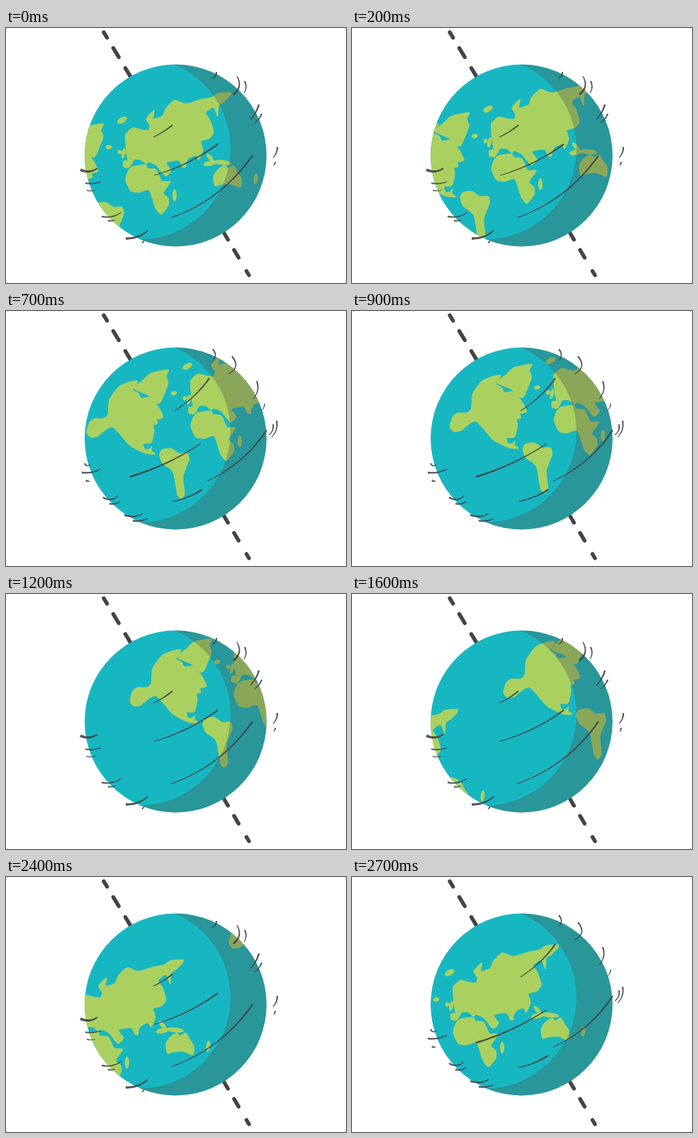
Write an HTML page with a canvas that moves like this. It is 480 px wide and 360 px high and loops after 2.8 s.

```html
<!DOCTYPE html>
<html lang="en">
<head>
<meta charset="utf-8">
<title>Spinning globe</title>
<style>
html, body { margin: 0; width: 480px; height: 360px; overflow: hidden; background: #fff; }
canvas { display: block; }
</style>
</head>
<body>
<canvas id="stage" width="480" height="360"></canvas>
<script>
const ctx = document.getElementById('stage').getContext('2d');
const LOOP = 2800, STEP = 100;
const OCEAN = '#17b7c2', LAND = '#aad15f', INK = '#444';
const GLOBE = { x: 239.4, y: 180, r: 128.4 };
const LIT = { x: 188.5, y: 170, r: 128.4 };

// A closed, lightly rounded curve through a few coast points.
function coast(outline) {
  const points = outline.trim().split(/\s+/).map(p => p.split(',').map(Number));
  const at = i => points[(i + points.length) % points.length];
  const path = new Path2D();
  path.moveTo(...at(0));
  points.forEach((p, i) => {
    const before = at(i - 1), q = at(i + 1), after = at(i + 2);
    const handle = (base, from, to) => base.map((v, k) => v + (to[k] - from[k]) / 9);
    path.bezierCurveTo(...handle(p, before, q), ...handle(q, after, p), ...q);
  });
  path.closePath();
  return path;
}

function island(x, y, rx, ry, angle = 0) {
  const path = new Path2D();
  path.ellipse(x, y, rx, ry, angle, 0, Math.PI * 2);
  return path;
}

const eurasia = coast(`169,163 169,150 179,141 193,144 201,144 203,137 198,128 209,116
  208,128 221,124 226,113 238,102 254,107 275,101 290,98 300,92 317,91 316,96 308,104
  300,110 299,125 293,112 282,120 288,130 293,147 287,156 275,160 278,172 272,186 268,180
  258,184 250,197 244,187 226,190 233,201 225,209 212,194 201,189 198,192 190,186 181,186
  174,197 166,196 166,188 172,187 170,176`);

const africa = coast(`178,196 197,193 200,198 212,200 220,216 232,217 222,233 229,240
  229,251 219,263 211,254 202,229 188,232 176,230 169,215 172,203`);

const australia = coast(`298,201 308,194 313,198 321,194 327,204 332,212 331,225 317,220
  303,221 295,223 293,210`);

const islands = [
  island(352.5, 213, 2.3, 7.5, .1),
  island(288, 183, 2.5, 7, -.7),
  island(288, 191, 9, 3.2, -.2),
  island(306, 190, 12, 3, .1),
  island(238, 236, 2.5, 8),
  island(252.5, 194.5, 1.5, 2.5),
  island(164, 130, 7, 3.6, -.5),
  island(145, 168, 4, 2.5, -.2),
  island(160.5, 175, 2.5, 2.8),
  island(166, 177, 2.2, 7, .2)
];

const northAmerica = coast(`175,151 179,137 186,132 198,132 205,126 207,105 220,87 236,80
  247,79 240,91 248,96 252,103 264,102 276,115 283,130 274,133 275,139 269,141 270,150
  266,166 255,167 257,175 263,175 267,171 266,177 272,182 258,181 236,170 222,154 212,144
  204,146 190,157 180,158`);

const greenland = coast(`290,63 287,72 290,82 282,103 278,110 271,109 262,99 241,89 254,78
  265,68`);

const southAmerica = coast(`278,184 281,176 294,174 305,181 317,181 319,191 311,213 313,238
  308,245 303,239 298,211 293,203 282,195`);

const oldWorld = [eurasia, africa, australia, ...islands];
const newWorld = [northAmerica, greenland, southAmerica];
const NEW_WORLD = { x: -153, y: 72 };

// Map drift: time, x, y. The map repeats after WRAP.
const DRIFT = [
  [0, 0, 0], [400, 56, -31], [700, 92, -52], [1200, 153, -72],
  [1600, 192, -84], [2000, 238, -102], [2700, 334, -151], [2800, 360, -156]
];
const WRAP = { x: 360, y: -156 };

function driftAt(time) {
  const next = DRIFT.findIndex(key => key[0] > time);
  const [t0, x0, y0] = DRIFT[next - 1];
  const [t1, x1, y1] = DRIFT[next];
  const f = (time - t0) / (t1 - t0);
  return { x: x0 + (x1 - x0) * f, y: y0 + (y1 - y0) * f };
}

function drawAxisPart(x0, y0, x1, y1, dashes) {
  ctx.strokeStyle = INK;
  ctx.lineWidth = 5.4;
  ctx.lineCap = 'round';
  ctx.setLineDash(dashes);
  ctx.beginPath();
  ctx.moveTo(x0, y0);
  ctx.lineTo(x1, y1);
  ctx.stroke();
  ctx.setLineDash([]);
}

function disc({ x, y, r }) {
  ctx.moveTo(x + r, y);
  ctx.arc(x, y, r, 0, Math.PI * 2);
}

function drawLands(lands, x, y) {
  ctx.save();
  ctx.translate(x, y);
  for (const land of lands) {
    ctx.fill(land);
    ctx.stroke(land);
  }
  ctx.restore();
}

function drawGlobe(time) {
  const drift = driftAt(time);
  ctx.save();
  ctx.beginPath();
  disc(GLOBE);
  ctx.fillStyle = OCEAN;
  ctx.fill();
  ctx.clip();

  ctx.fillStyle = ctx.strokeStyle = LAND;
  ctx.lineWidth = 1;
  ctx.lineJoin = 'round';
  for (const copy of [-1, 0]) {
    const x = drift.x + copy * WRAP.x, y = drift.y + copy * WRAP.y;
    drawLands(oldWorld, x, y);
    drawLands(newWorld, x + NEW_WORLD.x, y + NEW_WORLD.y);
  }

  // Night side: everything outside the lit disc.
  ctx.beginPath();
  ctx.rect(0, 0, 480, 360);
  disc(LIT);
  ctx.fillStyle = 'rgba(77, 87, 78, .345)';
  ctx.fill('evenodd');
  ctx.restore();
}

// A bent pencil stroke that thins out towards its end.
function pencil(x0, y0, x1, y1, bend, width = 2.2) {
  const length = Math.hypot(x1 - x0, y1 - y0);
  const cx = (x0 + x1) / 2 - (y1 - y0) / length * bend;
  const cy = (y0 + y1) / 2 + (x1 - x0) / length * bend;
  const left = [], right = [], n = 16;
  for (let i = 0; i <= n; i++) {
    const t = i / n, u = 1 - t;
    const x = u * u * x0 + 2 * u * t * cx + t * t * x1;
    const y = u * u * y0 + 2 * u * t * cy + t * t * y1;
    const dx = u * (cx - x0) + t * (x1 - cx);
    const dy = u * (cy - y0) + t * (y1 - cy);
    const half = width * (1 - t * .5) / 2 / Math.hypot(dx, dy);
    left.push([x - dy * half, y + dx * half]);
    right.unshift([x + dy * half, y - dx * half]);
  }
  ctx.beginPath();
  for (const point of left.concat(right)) ctx.lineTo(...point);
  ctx.closePath();
  ctx.fill();
}

function drawFirstPose() {
  pencil(297, 62, 291, 71, -4);
  pencil(321, 94, 326, 68, 11.5, 2.8);
  pencil(337, 75, 336, 92, -4.5);
  pencil(357, 108, 345, 129, -3.2, 2.6);
  pencil(361, 121, 351, 134, -2.5);
  pencil(383, 168, 377, 183, -3.4, 2.4);
  pencil(380, 189, 378, 194, -1);
  pencil(235, 137, 208, 154, -2);
  pencil(299, 164, 209, 208, -8.9);
  pencil(348, 180, 233, 268, -23);
  pencil(105, 200, 129, 198, 7, 3.8);
  pencil(112, 219, 134, 217, 3);
  pencil(114, 229, 126, 229, 2, 1.6);
  pencil(135, 266, 163, 260, 6.5);
  pencil(144, 272, 154, 271, 1.5);
  pencil(169, 297, 200, 286, 6.6, 3.4);
  pencil(192, 303, 195, 300, 1);
}

function drawSecondPose() {
  pencil(292, 54, 292, 70, -7);
  pencil(319, 64, 314, 89, -15.7);
  pencil(354, 99, 349, 124, -7.5);
  pencil(365, 131, 361, 140, -2, 1.6);
  pencil(382, 155, 375, 178, -6.3);
  pencil(377, 160, 371, 175, -4.9);
  pencil(287, 95, 238, 141, -6.6);
  pencil(175, 234, 275, 187, 8.4, 2.6);
  pencil(368, 168, 284, 240, -16);
  pencil(277, 252, 235, 269, -4.4, 2.4);
  pencil(111, 215, 119, 217, 5);
  pencil(107, 228, 134, 223, 4.5, 2.6);
  pencil(113, 239, 118, 240, 1.5, 2.6);
  pencil(137, 263, 158, 261, 8, 2.6);
  pencil(146, 272, 161, 269, 3.5, 2.4);
  pencil(167, 288, 193, 286, 6, 2.6);
  pencil(179, 296, 200, 293, 3.5, 2.6);
}

function draw(time) {
  ctx.fillStyle = '#fff';
  ctx.fillRect(0, 0, 480, 360);
  drawAxisPart(138, 6, 176, 69, [9, 17, 15, 18, 15]);
  drawAxisPart(307, 288, 343, 349, [12.5, 17, 12.5, 22, 8]);
  drawGlobe(time);
  ctx.fillStyle = 'rgba(62, 62, 62, .88)';
  if (time / STEP % 2) drawSecondPose();
  else drawFirstPose();
}

const start = performance.now();
function tick() {
  const elapsed = (performance.now() - start) % LOOP;
  draw(Math.floor(elapsed / STEP) * STEP);
  requestAnimationFrame(tick);
}
tick();
</script>
</body>
</html>
```
